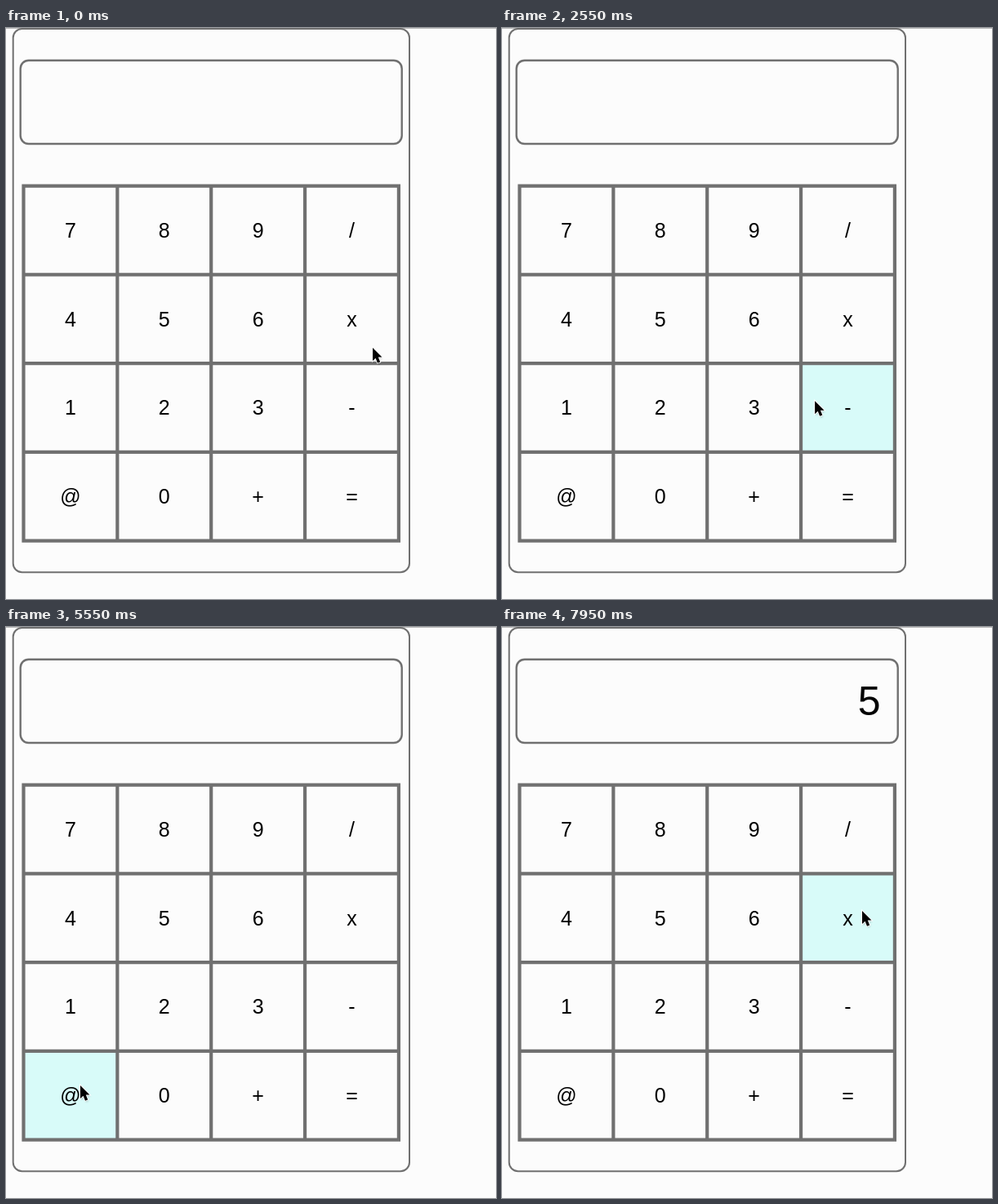
An HTML page for the animation above (8000 ms loop, 600x700 px).

```html
<!DOCTYPE html>
<html lang="en">
<head>
<meta charset="utf-8">
<title>Calculator</title>
<style>
  html, body { margin: 0; width: 100%; height: 100%; overflow: hidden; background: #fcfcfc; }
  svg { display: block; width: 600px; height: 700px; }
  text { font-family: "Liberation Sans", Arial, sans-serif; fill: #000; }
  .key { font-size: 25px; text-anchor: middle; }
  .result { font-size: 50px; text-anchor: end; }
  .hover { fill: #d8fbf9; opacity: 0; }
  .frame { fill: none; stroke: #707070; }
</style>
</head>
<body>
<svg viewBox="0 0 600 700">
  <rect width="600" height="700" fill="#fcfcfc"/>
  <rect width="600" height="1" fill="#bcbcbc"/>
  <rect class="frame" x="8.7" y="1" width="485.3" height="666.3" rx="11" stroke-width="2"/>
  <rect class="frame" x="17.7" y="39.7" width="467" height="102.3" rx="10" stroke-width="2.4"/>
  <g id="cells"></g>
  <path id="lines" class="frame" stroke-width="4.2" stroke-linecap="square"/>
  <g id="labels"></g>
  <text id="result" class="result" x="463.5" y="107.5"></text>
  <g id="cursor">
    <path d="M1 2V18L4.6 14.6L7 20.5L10 19.3L7.6 13.5H12.5Z" fill="#000" opacity=".2" style="filter:blur(1.2px)"/>
    <path d="M0 0V16L3.6 12.7L6 18.7L9.2 17.4L6.8 11.5H11.5Z" stroke="#fff" stroke-width="1.8" paint-order="stroke"/>
  </g>
</svg>
<script>
const LOOP = 8000, STEP = 50, FADE = 300;
const LEFT = 21.5, TOP = 193.6, COL = 114.85, ROW = 108.75;
const KEYS = '789/456x123-@0+=';

// Pointer tip: time, x, y
const PATH = [
  [0, 449, 392], [300, 362, 372], [550, 306, 362], [850, 306, 362],
  [1200, 314, 236], [1600, 314, 236],
  [2100, 392, 460], [2500, 392, 460],
  [3000, 75, 358], [3350, 75, 358],
  [3650, 418, 612], [4350, 418, 612],
  [4450, 372, 600], [4470, 248, 580], [4500, 160, 569],
  [4850, 70, 567], [5050, 74, 566], [5500, 74, 566],
  [5550, 91, 562], [5750, 180, 480], [5950, 240, 412], [6150, 299, 450],
  [6350, 280, 493], [6480, 318, 408], [6610, 349, 360], [6700, 310, 338],
  [6800, 223, 355], [6900, 143, 353], [7000, 162, 346], [7300, 162, 346],
  [7580, 360, 322], [7950, 441, 348], [8000, 441, 348]
];

const READOUT = [
  [0, ''], [700, '6'], [1400, '69'], [2350, ''],
  [3150, '4'], [3900, '65'], [5250, ''], [7200, '5']
];

const $ = id => document.getElementById(id);

function add(parent, tag, attrs, content = '') {
  const node = document.createElementNS('http://www.w3.org/2000/svg', tag);
  for (const name in attrs) node.setAttribute(name, attrs[name]);
  node.textContent = content;
  return parent.appendChild(node);
}

const cells = [...KEYS].map((key, i) => {
  const x = LEFT + (i % 4) * COL, y = TOP + Math.floor(i / 4) * ROW;
  add($('labels'), 'text', { class: 'key', x: x + COL / 2, y: y + 63.2 }, key);
  return add($('cells'), 'rect', { class: 'hover', x, y, width: COL, height: ROW });
});

let lines = '';
for (let i = 0; i < 5; i++) {
  lines += `M${LEFT + i * COL} ${TOP}v${4 * ROW}M${LEFT} ${TOP + i * ROW}h${4 * COL}`;
}
$('lines').setAttribute('d', lines);

// Monotone cubic interpolation, so stops never overshoot
function slope(i, axis) {
  if (i < 0 || i >= PATH.length - 1) return 0;
  const [a, b] = [PATH[i], PATH[i + 1]];
  return (b[axis] - a[axis]) / (b[0] - a[0]);
}

function tangent(i, axis) {
  const before = slope(i - 1, axis), after = slope(i, axis);
  return before * after <= 0 ? 0 : 2 * before * after / (before + after);
}

function pointer(t) {
  let i = PATH.length - 2;
  while (PATH[i][0] > t) i--;
  const span = PATH[i + 1][0] - PATH[i][0], u = (t - PATH[i][0]) / span;
  return [1, 2].map(axis => {
    const a = PATH[i][axis], b = PATH[i + 1][axis];
    return a + (b - a) * u * u * (3 - 2 * u)
      + span * u * (1 - u) * ((1 - u) * tangent(i, axis) - u * tangent(i + 1, axis));
  });
}

// The CSS "ease" curve
function ease(p) {
  if (p <= 0) return 0;
  if (p >= 1) return 1;
  let lo = 0, hi = 1;
  for (let n = 0; n < 16; n++) {
    const s = (lo + hi) / 2;
    const x = 0.75 * s * (1 - s) + s ** 3;
    if (x < p) lo = s; else hi = s;
  }
  return 0.3 * lo * (1 - lo) ** 2 + 3 * lo * lo * (1 - lo) + lo ** 3;
}

function cellAt([x, y]) {
  const col = Math.floor((x - LEFT) / COL), row = Math.floor((y - TOP) / ROW);
  return row * 4 + col;
}

const visits = [];
for (let t = 0; t < LOOP; t += 5) {
  const cell = cellAt(pointer(t)), last = visits[visits.length - 1];
  if (last && last.cell === cell) continue;
  if (last) last.end = t;
  visits.push({ cell, start: t, end: LOOP });
}

function glow(cell, t) {
  return Math.max(0, ...visits.filter(v => v.cell === cell).map(v =>
    ease((Math.min(t, v.end) - v.start) / FADE) * (1 - ease((t - v.end) / FADE))));
}

function draw(t) {
  cells.forEach((cell, i) => { cell.style.opacity = glow(i, t); });
  $('cursor').setAttribute('transform', `translate(${pointer(t)})`);
  $('result').textContent = READOUT.filter(entry => entry[0] <= t).pop()[1];
}

const begin = performance.now();
function tick() {
  const t = (performance.now() - begin) % LOOP;
  draw(Math.floor(t / STEP) * STEP);
  requestAnimationFrame(tick);
}
tick();
</script>
</body>
</html>
```
